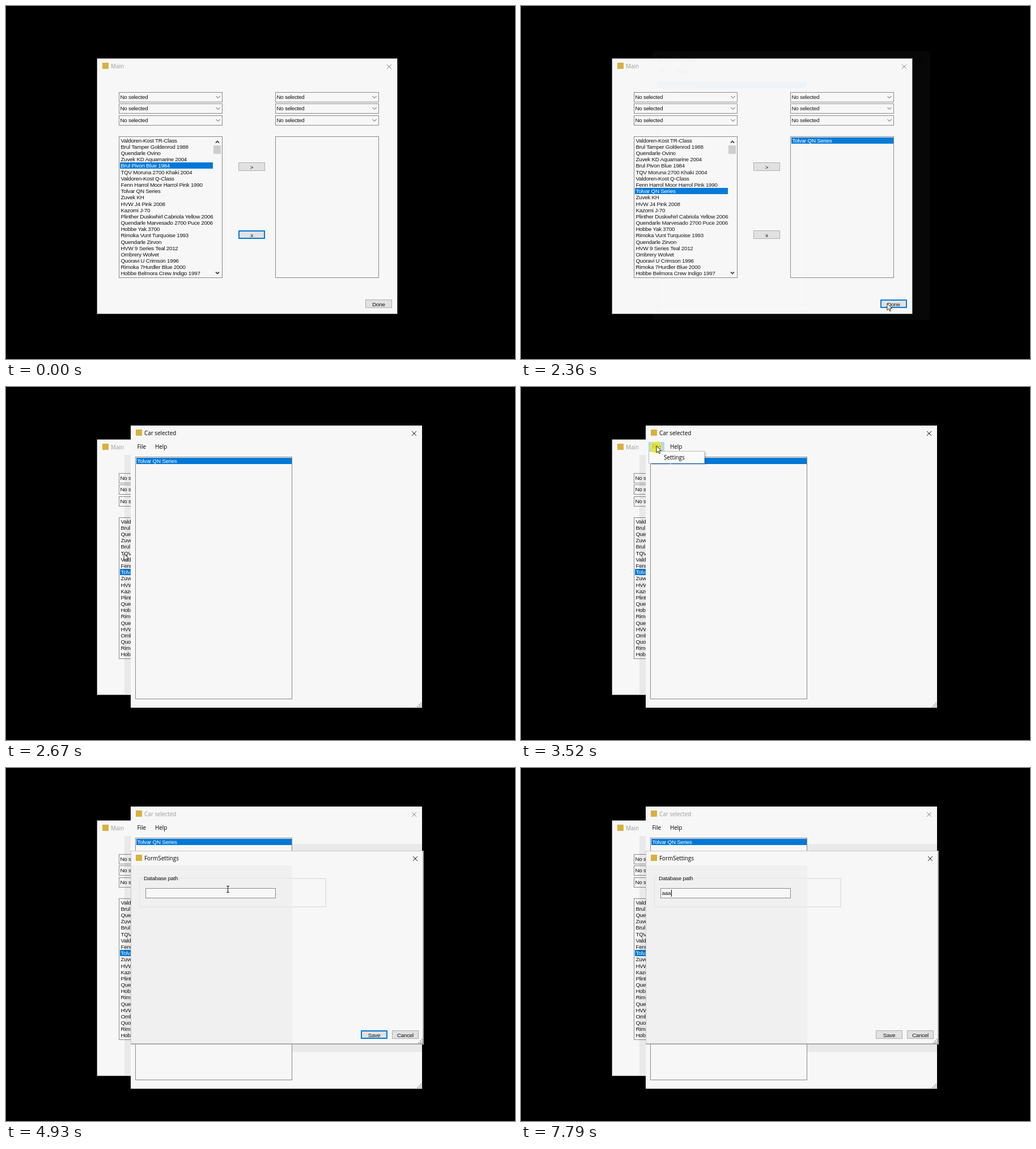
An HTML page that plays this animation: 898x623 px, repeating every 8 s.

```html
<!DOCTYPE html>
<html lang="en">
<head>
<meta charset="utf-8">
<title>Car picker</title>
<style>
html, body { margin: 0; width: 100%; height: 100%; overflow: hidden; background: #000; }
#stage { position: relative; width: 898px; height: 623px; overflow: hidden; background: #000; }
#stage * { position: absolute; box-sizing: border-box; }
.layer { left: 0; top: 0; width: 898px; height: 623px; }
.win { background: #f7f7f7; }
.strip { background: #f7f7f7; }
.opening .strip { background: #fff; }
.text, .button { font: 9.8px/16px "Liberation Sans", Arial, sans-serif; letter-spacing: -.25px; color: #111; white-space: pre; }
.ui { font: 9.9px/16px "Open Sans", "Noto Sans", sans-serif; color: #000; white-space: pre; }
.idle .title { color: #999; }
.idle .close { opacity: .5; }
.icon { background: #d9b040; }
.field { border: 1px solid #888; background: #f7f7f7; }
.pick { background: #0078d7; }
.thumb { background: #cdcdcd; }
.gray { background: #f0f0f0; }
.edge { border: 1px solid #c8c8c8; border-width: 1px 2px 2px 1px; border-right-color: #aaa; border-bottom-color: #aaa; }
.group { border: 1px solid #e2e2e2; }
.group.bold { border: 2px solid #e4e4e4; border-left: 0; }
.sheet { background: #fafafa; border: 1px solid #bbb; box-shadow: 3px 2px 2px #0002; }
.hot { background: #b3d7f3; }
.caret { background: #000; }
.button { border: 1px solid #adadad; background: #e1e1e1; text-align: center; }
.button.focus { border: 2px solid #0078d7; line-height: 14px; }
.button.down { border: 1px solid #005499; background: #cce4f7; line-height: 16px; }
.shade { background: rgba(0, 0, 0, .06); }
.ring { width: 21px; height: 21px; border-radius: 50%; background: rgba(240, 238, 20, .75); }
svg { overflow: visible; fill: none; }
</style>
</head>
<body>
<div id="stage"></div>
<script>
const LOOP = 8000;
const STEP = 76.7;    // screen refresh, ms
const ROW = 11.18;    // list row height
const CARS = [
  "Valdoren-Kost TR-Class", "Brul Tamper Goldenrod 1988", "Quendarle Ovino",
  "Zuvek KD Aquamarine 2004", "Brul Pivon Blue 1984", "TQV Moruna 2700 Khaki 2004",
  "Valdoren-Kost Q-Class", "Fenn Harrol Moor Harrol Pink 1990", "Tolvar QN Series",
  "Zuvek KH", "HVW J4 Pink 2008", "Kazomi J-70",
  "Plinther Duskwhirl Cabriola Yellow 2006", "Quendarle Marvesado 2700 Puce 2006",
  "Hobbe Yak 3700", "Rimoka Vunt Turquoise 1993", "Quendarle Zirvon",
  "HVW 9 Series Teal 2012", "Ombrery Wolvet", "Quoravi U Crimson 1996",
  "Rimoka 7Hurdler Blue 2000", "Hobbe Belmora Crew Indigo 1997"
];
const FIRST = 4, CHOSEN = 8;

const CLICK = { pick: 640, add: 1330, done: 2180, file: 3420, item: 3960, field: 5330 };
const KEYS = { from: 7490, gap: 150 };

// Pointer moves after the entry point: departure, arrival, x, y
const ENTRY = [764, 580];
const MOVES = [
  [70, 600, 247, 330],
  [890, 1290, 434, 281],
  [1740, 2140, 646, 525],
  [2490, 2680, 208, 294],
  [2690, 3280, 239, 104],
  [3640, 3760, 264, 123],
  [4010, 4260, 284, 206],
  [4530, 4920, 392, 214],
  [4930, 5310, 296, 219]
];

const stage = document.getElementById("stage");
const SVG = "http://www.w3.org/2000/svg";

function box(parent, cls, x, y, w, h) {
  const el = document.createElement("div");
  el.className = cls;
  el.style.cssText = `left:${x}px;top:${y}px` + (w ? `;width:${w}px;height:${h}px` : "");
  return parent.appendChild(el);
}

function label(parent, text, x, midY, cls = "text", color = "") {
  const el = box(parent, cls, x, midY - 8);
  el.textContent = text;
  el.style.color = color;
  return el;
}

function line(parent, d, x, y, attrs = {}) {
  const svg = document.createElementNS(SVG, "svg");
  const path = document.createElementNS(SVG, "path");
  svg.setAttribute("width", 1);
  svg.setAttribute("height", 1);
  svg.style.cssText = `left:${x}px;top:${y}px`;
  const all = { d, stroke: "#444", "stroke-width": 1, ...attrs };
  for (const key in all) path.setAttribute(key, all[key]);
  svg.append(path);
  parent.append(svg);
  return svg;
}

function button(parent, text, x, y) {
  const el = box(parent, "button", x, y, 47, 15);
  el.textContent = text;
  return el;
}

function makeWindow(title, x, y, w, h, stripH, shades = []) {
  const layer = box(stage, "layer", 0, 0);
  layer.style.transformOrigin = `${x + w / 2}px ${y + h / 2}px`;
  shades.forEach(s => box(layer, "shade", ...s));
  box(layer, "win", x, y, w, h);
  box(layer, "strip", x, y, w, stripH);
  box(layer, "icon", x + 9, y + 7, 11, 11);
  label(layer, title, x + 24, y + 13, "ui title");
  line(layer, "M-4-4L4 4M4-4L-4 4", x + w - 14.5, y + 13.5, { stroke: "#111" })
    .classList.add("close");
  return layer;
}

function grip(parent, x, y) {
  let d = "";
  for (let r = 0; r < 3; r++)
    for (let c = 2 - r; c < 3; c++) d += `M${c * 3} ${r * 3}h2`;
  line(parent, d, x, y, { stroke: "#aaa", "stroke-width": 2 });
}

function selection(parent, text, x, y, w) {
  const layer = box(parent, "layer", 0, 0);
  box(layer, "pick", x, y, w, 11);
  label(layer, text, x + 1.5, y + 6, "text", "#fff");
  return layer;
}

// Main window
const main = makeWindow("Main", 161, 93, 529, 450, 26);
main.querySelector(".win").style.boxShadow = "0 0 0 1px #555";
for (const x of [199, 475]) {
  for (let i = 0; i < 3; i++) {
    const y = Math.floor(152 + i * 20.7);
    box(main, "field", x, y, 183, 18);
    label(main, "No selected", x + 2.5, y + 8.5);
    line(main, "M-3.5-2L0 1.5L3.5-2", x + 175, y + 9);
  }
  box(main, "field", x, 230, 183, 250);
}
CARS.forEach((car, i) => label(main, car, 202.5, 237.7 + i * ROW));
const picks = [FIRST, CHOSEN].map(i =>
  selection(main, CARS[i], 201, Math.round(231.5 + i * ROW), 164));
for (const [y, tip] of [[239.5, -1.5], [471, 1.5]])
  line(main, `M-3 ${-tip}L0 ${tip}L3 ${-tip}`, 372.5, y, { "stroke-width": 1.8 });
box(main, "thumb", 366, 246, 13, 15);
const moved = selection(main, CARS[CHOSEN], 477, 232, 180);
const add = button(main, ">", 410, 276);
const drop = button(main, "x", 410, 396);
const done = button(main, "Done", 634, 518);

// Selected cars
const car = makeWindow("Car selected", 220, 68, 514, 498, 48, [[209, 120, 11, 422]]);
const fileHot = box(car, "hot", 225, 97, 28, 16);
label(car, "File", 231.5, 104.5, "ui");
label(car, "Help", 263, 104.5, "ui");
box(car, "field", 228, 123, 277, 428);
selection(car, CARS[CHOSEN], 230, 125, 274);
grip(car, 725, 558);

const menu = box(car, "layer", 0, 0);
box(menu, "sheet", 225, 113, 99, 22);
const itemHot = box(menu, "hot", 227, 115, 95, 18);
label(menu, "Settings", 252, 124, "ui");

// Settings dialog
const settings = makeWindow("FormSettings", 220, 146, 516, 342, 26,
  [134, 488].map(y => [505, y, 229, 13]));
box(settings, "gray", 220, 172, 285, 315);
box(settings, "edge", 220, 146, 517, 342);
box(settings, "group", 235, 194, 330, 52);
box(settings, "group bold", 505, 194, 60, 52);
box(settings, "gray", 241, 190, 64, 10);
label(settings, "Database path", 243, 194.5);
box(settings, "field", 246, 212, 230, 18);
const typed = label(settings, "", 248.5, 221);
const caret = box(settings, "caret", 249, 215, 1, 12);
const save = button(settings, "Save", 626, 463);
button(settings, "Cancel", 681, 463);
grip(settings, 727, 479);

// Pointer
const ring = box(stage, "ring", 0, 0);
const arrow = line(stage, "M0 0V12L2.8 9.4L4.6 13.6L6.5 12.8L4.7 8.7H8.5Z", 0, 0,
  { fill: "#fff", stroke: "#111", "stroke-width": .9 });
const beam = line(stage, "M-2.5-5.5H2.5M0-5.5V5.5M-2.5 5.5H2.5", 0, 0, { stroke: "#111" });

const clamp = v => Math.max(0, Math.min(1, v));
const ease = k => k * k * (3 - 2 * k);
const show = (el, on) => { el.style.visibility = on ? "inherit" : "hidden"; };
const mark = (el, cls, on) => el.classList.toggle(cls, on);
const place = (el, x, y) => { el.style.transform = `translate(${x}px,${y}px)`; };

function pointer(t) {
  let [x, y] = ENTRY;
  for (const [from, to, nextX, nextY] of MOVES) {
    const k = ease(clamp((t - from) / (to - from)));
    x += (nextX - x) * k;
    y += (nextY - y) * k;
  }
  return [x, y];
}

function open(layer, p) {
  show(layer, p > 0);
  layer.style.opacity = p;
  layer.style.transform = p < 1 ? `scale(${.95 + .05 * p})` : "none";
  mark(layer, "opening", p < 1);
}

function draw(t) {
  const s = 70 + STEP * Math.floor((t - 70) / STEP + .25);
  const within = (from, to) => s >= from && s < to;
  const carIn = clamp((s - CLICK.done - 185) / 235);
  const settingsIn = clamp((s - CLICK.item - 20) / 200);

  mark(main, "idle", s < CLICK.pick || carIn > 0);
  show(picks[0], s < CLICK.pick);
  show(picks[1], s >= CLICK.pick);
  show(moved, s >= CLICK.add + 230);
  mark(drop, "focus", s < CLICK.pick);
  mark(add, "down", within(CLICK.add, CLICK.add + 150));
  mark(add, "focus", within(CLICK.add, CLICK.done));
  mark(done, "down", within(CLICK.done, CLICK.done + 150));
  mark(done, "focus", s >= CLICK.done);

  open(car, carIn);
  mark(car, "idle", settingsIn > 0);
  show(fileHot, within(3250, CLICK.item));
  show(menu, within(CLICK.file + 80, CLICK.item + 60));
  show(itemHot, within(3650, CLICK.item + 60));

  open(settings, settingsIn);
  mark(save, "focus", s < CLICK.field);
  const count = Math.max(0, Math.min(3, 1 + Math.floor((t - KEYS.from) / KEYS.gap)));
  typed.textContent = "a".repeat(count);
  caret.style.left = 249 + Math.round(count * 5.25) + "px";
  show(caret, s >= CLICK.field && (t < 6480 || t >= 7010));

  const [x, y] = pointer(s);
  const overField = settingsIn === 1 && x > 246 && x < 476 && y > 212 && y < 230;
  const visible = t >= 70 && t < KEYS.from;
  show(arrow, visible && !overField);
  show(beam, visible && overField);
  show(ring, Object.values(CLICK).some(c => within(c, c + 150)));
  place(arrow, x, y);
  place(beam, Math.round(x) + .5, y);
  place(ring, x - 11.5, y - (overField ? 10 : 8));
}

const began = performance.now();
function tick() {
  draw((performance.now() - began) % LOOP);
  requestAnimationFrame(tick);
}
tick();
</script>
</body>
</html>
```
